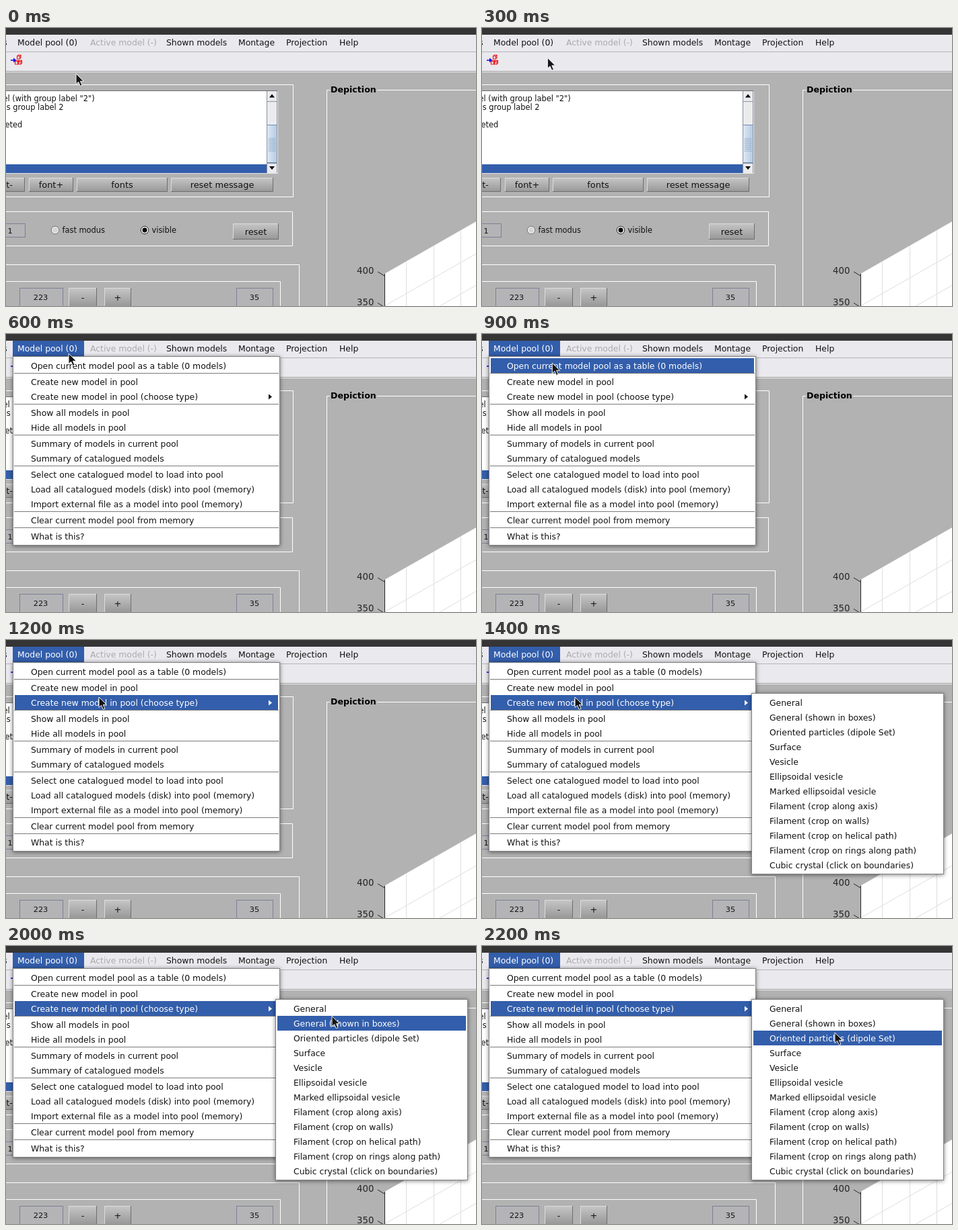
Animation of 698 by 414 pixels, one loop 3.6 s. Source, as an HTML page:

```html
<!DOCTYPE html>
<html lang="en">
<head>
<meta charset="utf-8">
<title>Model pool menu</title>
<style>
html, body { margin: 0; width: 100%; height: 100%; overflow: hidden; background: #b2b2b2; }
svg { display: block; width: 100%; height: 100%; }
text { font-family: "DejaVu Sans", sans-serif; }
.popup { filter: drop-shadow(0 1px 3px rgba(0, 0, 0, .5)); }
</style>
</head>
<body>
<svg id="stage" viewBox="0 0 698 414" preserveAspectRatio="none">
  <defs>
    <linearGradient id="face" x2="0" y2="1">
      <stop offset="0" stop-color="#c6c6c6"/>
      <stop offset="1" stop-color="#979797"/>
    </linearGradient>
    <linearGradient id="thumb">
      <stop offset="0" stop-color="#dfe9f4"/>
      <stop offset="1" stop-color="#b3cae3"/>
    </linearGradient>
    <pattern id="dots" width="3" height="3" patternUnits="userSpaceOnUse">
      <path d="M0 0h1v1H0zM1.5 1.5h1v1h-1z" fill="#6d89b0"/>
    </pattern>
  </defs>
</svg>
<script>
const NS = 'http://www.w3.org/2000/svg';
const LOOP = 3600, STEP = 100, ROW = 22;
const BLUE = '#335eab', INK = '#111', SANS = 12.4;
const svg = document.getElementById('stage');

function el(parent, tag, attrs) {
  const node = document.createElementNS(NS, tag);
  for (const key in attrs) node.setAttribute(key, attrs[key]);
  return parent.appendChild(node);
}
const group = (parent, attrs = {}) => el(parent, 'g', attrs);
const box = (parent, x, y, width, height, fill, attrs = {}) =>
  el(parent, 'rect', { x, y, width, height, fill, ...attrs });
const line = (parent, d, stroke = '#fff', width = 1) =>
  el(parent, 'path', { d, stroke, 'stroke-width': width, fill: 'none' });
const shape = (parent, d, fill) => el(parent, 'path', { d, fill });
function label(parent, str, x, y, size = SANS, anchor = 'start', attrs = {}) {
  const node = el(parent, 'text', { x, y, fill: INK, 'text-anchor': anchor, ...attrs });
  node.style.fontSize = size + 'px';
  node.textContent = str;
  return node;
}
const show = (node, on) => node.setAttribute('visibility', on ? 'visible' : 'hidden');

function button(parent, str, x, y, w, h) {
  box(parent, x, y, w, h, 'url(#face)');
  line(parent, `M${x + .5} ${y + h}V${y + .5}H${x + w}`, '#dcdcdc');
  line(parent, `M${x} ${y + h - .5}H${x + w - .5}V${y}`, '#6e6e6e');
  label(parent, str, x + w / 2, y + h / 2 + 4.5, 12.9, 'middle');
}
function field(parent, str, x, y, w, h, cx) {
  box(parent, x + .5, y + .5, w - 1, h - 1, '#b4b4b6', { stroke: '#7d7f96' });
  label(parent, str, cx, y + h / 2 + 4, 11.3, 'middle');
}
function radio(parent, str, x, y, on) {
  el(parent, 'circle', { cx: x, cy: y, r: 5.8, fill: '#d6d6d6', stroke: on ? '#333' : '#777' });
  el(parent, 'circle', { cx: x, cy: y, r: 4.6, fill: 'none', stroke: '#f2f2f2' });
  if (on) el(parent, 'circle', { cx: x, cy: y, r: 3.4, fill: '#000' });
  label(parent, str, x + 10.5, y + 4, 11.4);
}

function drawWindow(g) {
  box(g, 0, 0, 698, 414, '#b2b2b2');
  box(g, 0, 0, 698, 10, '#353535');
  box(g, 0, 10, 698, 54, '#eae9ee');
  line(g, 'M0 35.5H698', '#b5b5b9');
  line(g, 'M0 64.5H698', '#9a9a9a');
  line(g, 'M0 65.5H698', '#f4f4f4');

  // toolbar icon
  line(g, 'M7 48H13', '#1010f0', 1.6);
  shape(g, 'M11 44.5L15.5 48L11 51.5Z', '#1010f0');
  for (const [x, y] of [[16.5, 42], [13.5, 50], [18, 50]])
    line(g, `M${x} ${y}h4v4h-4zl1.5 -1.7h4v4l-1.5 1.7M${x + 4} ${y}l1.5 -1.7`, '#ee1515', 1.1);

  // group frames
  line(g, 'M0 84.5H426.5V251.5H0M0 273.5H425.5V324.5H0M0 352.5H435.5V414M0 377.5H407.5V414');
  line(g, 'M481 92.5H476.5V414M551 92.5H698');
  label(g, 'Depiction', 482, 96, 12.6, 'start', { 'font-weight': 'bold', fill: '#000' });

  // message list
  box(g, 0, 94, 403, 123, '#fff');
  line(g, 'M0 93.5H403', '#6f6f75');
  label(g, 'el (with group label "2")', 131.6, 109, 11.4, 'end');
  label(g, 's group label 2', 85.5, 122, 11.4, 'end');
  label(g, 'eted', 24.3, 148, 11.4, 'end');
  box(g, 0, 203, 387, 13, BLUE);
  line(g, 'M0 216.5H404M403.5 94V217', '#e6e6e6');

  // scroll bar
  box(g, 387, 94, 16, 122, '#ebebee');
  box(g, 387.5, 144.5, 15, 56, 'url(#thumb)', { stroke: '#6f88b4' });
  box(g, 390, 163, 10, 21, 'url(#dots)');
  line(g, 'M387.5 94V216M402.5 94V216M387 109.5H403M387 201.5H403', '#8b93a3');
  shape(g, 'M391 103.5H399L395 98.5Z', '#000');
  shape(g, 'M391 206H399L395 211Z', '#000');

  button(g, 't-', -18, 223, 46, 21);
  button(g, 'font+', 34, 223, 66, 21);
  button(g, 'fonts', 105, 223, 135, 21);
  button(g, 'reset message', 245, 223, 152, 21);
  field(g, '1', -20, 291, 49, 21, 6);
  radio(g, 'fast modus', 73, 301, false);
  radio(g, 'visible', 206, 301, true);
  button(g, 'reset', 337, 291, 68, 24);
  field(g, '223', 20, 387, 65, 28, 51.5);
  button(g, '-', 93, 387, 42, 28);
  button(g, '+', 146, 387, 40, 28);
  field(g, '35', 342, 387, 55, 28, 369);

  // plot corner
  const edge = x => 365.5 - (x - 563) * .572;
  shape(g, `M563 365.5L698 ${edge(698)}V414H563Z`, '#fff');
  for (const x of [594.5, 635.5, 675.5]) line(g, `M${x} ${edge(x)}V414`, '#dedede');
  for (const dy of [48, 95]) line(g, `M563 ${edge(563) + dy}L698 ${edge(698) + dy}`, '#dedede');
  line(g, 'M562.5 366V414', '#262626');
  line(g, 'M552 363L562.5 369.3M552 409.5L562.5 415.8', '#262626');
  label(g, '400', 546.5, 366, 13.3, 'end', { fill: '#262626' });
  label(g, '350', 546.5, 413, 13.3, 'end', { fill: '#262626' });
}

function popup(x, y, w, rows, seps) {
  const g = group(svg);
  const h = rows.length * ROW + seps.length * 2 + 6;
  const panel = group(g, { class: 'popup' });
  box(panel, x + .5, y + .5, w - 1, h - 1, '#fff', { stroke: '#818181' });
  let top = y + 3;
  const items = rows.map((str, i) => {
    const bar = box(g, x + 3, top, w - 6, ROW, BLUE);
    const text = label(g, str, x + 27, top + 16);
    const item = { top, bar, text };
    top += ROW;
    if (seps.includes(i)) {
      line(g, `M${x + 2} ${top + .5}H${x + w - 2}`, '#7a7a7a');
      top += 2;
    }
    return item;
  });
  const select = index => items.forEach((item, i) => {
    item.bar.setAttribute('visibility', i === index ? 'inherit' : 'hidden');
    item.text.setAttribute('fill', i === index ? '#fff' : INK);
  });
  const rowAt = py => items.findIndex(item => py >= item.top && py < item.top + ROW);
  return { g, select, rowAt };
}

drawWindow(group(svg));

const hover = box(svg, 10.5, 10.5, 105, 21, '#efeef2', { stroke: '#8a8a8a' });
const openTab = box(svg, 10, 10, 106, 23, BLUE);
label(svg, 's', 1.6, 26, SANS, 'end');
const poolText = label(svg, 'Model pool (0)', 17, 26);
label(svg, 'Active model (-)', 125, 26, SANS, 'start', { fill: '#aaaaad' });
[['Shown models', 238], ['Montage', 345], ['Projection', 416], ['Help', 495]]
  .forEach(([str, x]) => label(svg, str, x, 26));

const menu = popup(10, 33, 397, [
  'Open current model pool as a table (0 models)',
  'Create new model in pool',
  'Create new model in pool (choose type)',
  'Show all models in pool',
  'Hide all models in pool',
  'Summary of models in current pool',
  'Summary of catalogued models',
  'Select one catalogued model to load into pool',
  'Load all catalogued models (disk) into pool (memory)',
  'Import external file as a model into pool (memory)',
  'Clear current model pool from memory',
  'What is this?'
], [0, 2, 4, 6, 9, 10]);
const menuArrow = shape(menu.g, 'M390 89.5V97.5L395 93.5Z', INK);

const types = popup(400, 79, 286, [
  'General',
  'General (shown in boxes)',
  'Oriented particles (dipole Set)',
  'Surface',
  'Vesicle',
  'Ellipsoidal vesicle',
  'Marked ellipsoidal vesicle',
  'Filament (crop along axis)',
  'Filament (crop on walls)',
  'Filament (crop on helical path)',
  'Filament (crop on rings along path)',
  'Cubic crystal (click on boundaries)'
], []);

const cursor = el(svg, 'path', {
  d: 'M0 0V15.5L3.6 12.3L6.3 18.4L9 17.3L6.4 11.3H11.3Z',
  fill: '#161616', stroke: '#f4f4f4', 'stroke-width': 1, 'stroke-linejoin': 'round'
});

// pointer stops: time, x, y
const path = [
  [0, 104, 68], [500, 93, 29], [800, 93, 29], [1200, 138, 85], [1400, 138, 85],
  [1700, 437, 82.5], [1900, 464, 92], [2200, 524, 129], [LOOP, 524, 129]
];
function pointer(t) {
  const i = path.findIndex(stop => t < stop[0]);
  const [t0, x0, y0] = path[i - 1], [t1, x1, y1] = path[i];
  const k = (t - t0) / (t1 - t0);
  return [x0 + (x1 - x0) * k, y0 + (y1 - y0) * k];
}

function render(ms) {
  const t = Math.floor((ms % LOOP) / STEP) * STEP;
  const [x, y] = pointer(t);
  const isOpen = t >= 600, isDeep = t >= 1400;
  show(hover, !isOpen && y < 34);
  show(openTab, isOpen);
  poolText.setAttribute('fill', isOpen ? '#fff' : INK);
  show(menu.g, isOpen);
  show(types.g, isDeep);
  const row = isDeep ? 2 : menu.rowAt(y);
  menu.select(row);
  menuArrow.setAttribute('fill', row === 2 ? '#fff' : INK);
  types.select(x > 402 ? types.rowAt(y) : -1);
  cursor.setAttribute('transform', `translate(${x} ${y})`);
}

const start = performance.now();
function tick() {
  render(performance.now() - start);
  requestAnimationFrame(tick);
}
render(0);
requestAnimationFrame(tick);
</script>
</body>
</html>
```
